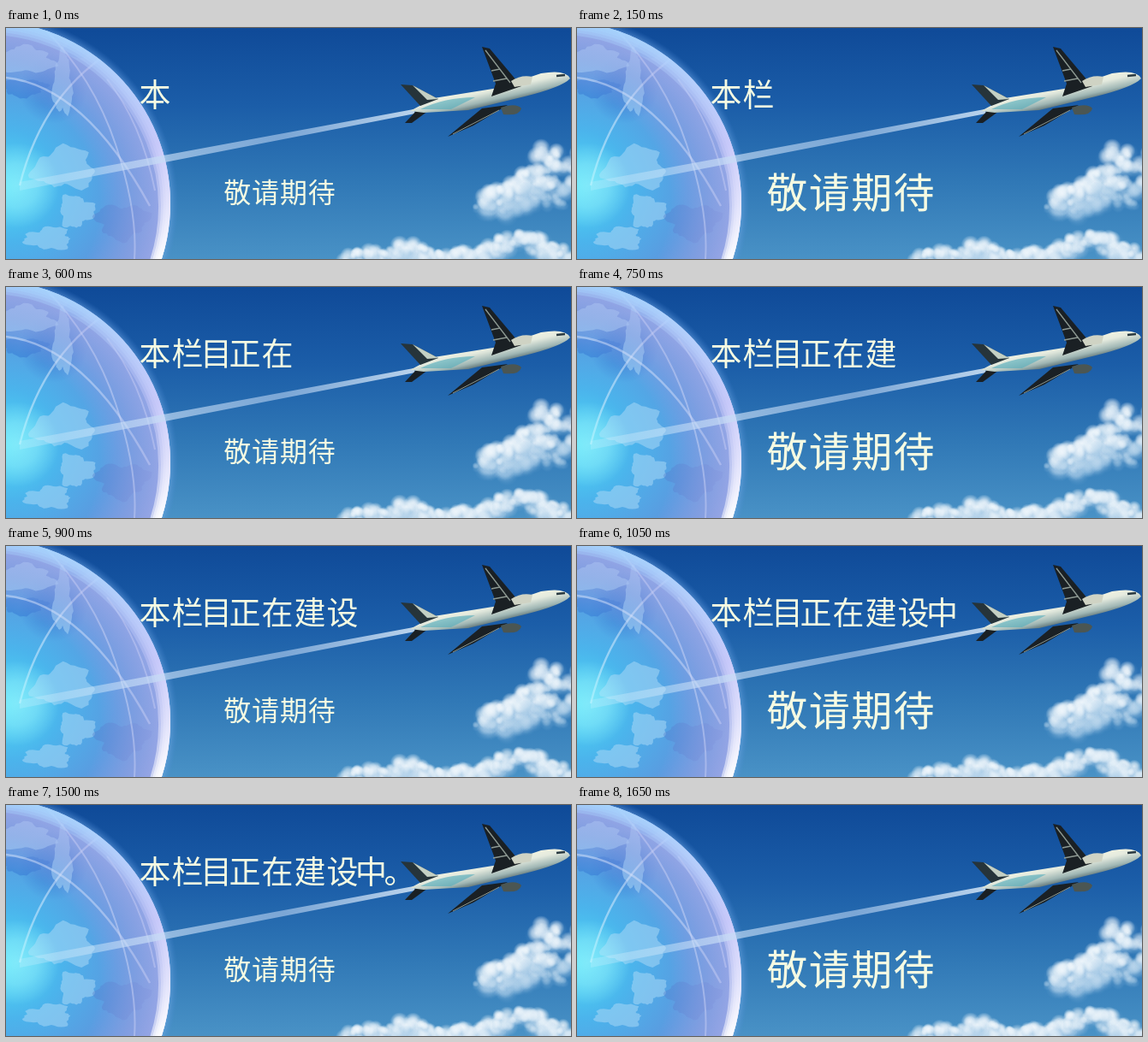
An HTML page with a canvas for the animation above (1800 ms loop, 660 by 270 pixels).

```html
<!DOCTYPE html>
<html lang="zh">
<head>
<meta charset="utf-8">
<style>
html, body { margin: 0; width: 100%; height: 100%; overflow: hidden; background: #1b5da8; }
canvas { display: block; }
</style>
</head>
<body>
<canvas id="stage" width="660" height="270"></canvas>
<script>
const W = 660, H = 270, STEP = 150, STEPS = 12, TAU = Math.PI * 2;
const stage = document.getElementById('stage').getContext('2d');
const scenery = document.createElement('canvas');
scenery.width = W;
scenery.height = H;
const g = scenery.getContext('2d');

let seed = 11;
function random() {
  seed = (seed * 16807) % 2147483647;
  return seed / 2147483647;
}
const bump = (x, center, width) => Math.exp(-(((x - center) / width) ** 2));

// Spreads the colors evenly along the gradient.
function spread(gradient, colors) {
  colors.forEach((color, i) => gradient.addColorStop(i / (colors.length - 1), color));
  return gradient;
}
const linear = (x0, y0, x1, y1, ...colors) => spread(g.createLinearGradient(x0, y0, x1, y1), colors);
const radial = (x, y, r0, r1, ...colors) => spread(g.createRadialGradient(x, y, r0, x, y, r1), colors);

function wash(fill) {
  g.fillStyle = fill;
  g.fillRect(0, 0, W, H);
}
function glow(x, y, r, rgb, alpha) {
  g.fillStyle = radial(x, y, 0, r, `rgba(${rgb},${alpha})`, `rgba(${rgb},${alpha * 0.7})`, `rgba(${rgb},0)`);
  g.fillRect(x - r, y - r, r * 2, r * 2);
}
function shape(path, fill) {
  g.fillStyle = fill;
  g.fill(new Path2D(path));
}
function line(path, color, width) {
  g.strokeStyle = color;
  g.lineWidth = width;
  g.stroke(new Path2D(path));
}

// An ellipse with a rough coastline.
function island(x, y, rx, ry, fill) {
  const phase = random() * TAU;
  g.beginPath();
  for (let a = 0; a < TAU; a += 0.12) {
    const k = 1 + 0.16 * Math.sin(3 * a + phase) + 0.1 * Math.sin(7 * a - phase) + 0.12 * (random() - 0.5);
    g.lineTo(x + Math.cos(a) * rx * k, y + Math.sin(a) * ry * k);
  }
  g.fillStyle = fill;
  g.fill();
}

function drawGlobe() {
  const x = -21, y = 205, r = 213;
  wash(radial(x, y, r - 2, r + 9, 'rgba(130,185,240,.5)', 'rgba(80,140,220,0)'));
  g.save();
  g.beginPath();
  g.arc(x, y, r, 0, TAU);
  g.clip();
  wash(radial(0, 185, 0, 195, '#4cdcf6', '#4bb4ec', '#5a9be0', '#6f95d8'));
  glow(55, 72, 40, '40,100,200', 0.4);

  const land = 'rgba(160,212,246,.6)';
  island(22, 38, 34, 15, land);
  island(66, 66, 11, 36, land);
  island(68, 164, 35, 24, land);
  island(82, 214, 20, 18, land);
  island(50, 246, 26, 13, land);
  island(136, 226, 30, 20, 'rgba(85,125,205,.4)');
  island(20, 70, 26, 10, 'rgba(52,120,212,.5)');
  island(86, 26, 18, 8, 'rgba(52,120,212,.5)');

  const grid = 'rgba(228,242,255,.5)';
  line('M44 0Q102 58 128 136T150 270', grid, 2);
  line('M0 58Q92 68 168 208', grid, 2.5);
  line('M16 184Q44 72 132 22', grid, 2.5);
  line('M118 60Q158 110 174 190', grid, 2);

  wash(radial(x, y, 130, r, 'rgba(165,165,235,0)', 'rgba(165,165,230,.42)', 'rgba(180,180,240,.68)'));
  glow(12, 184, 50, '170,250,255', 0.55);
  // The rim brightens and thickens towards the bottom.
  const light = linear(0, 0, 0, H, 'rgba(165,215,255,.35)', 'rgba(205,205,252,.4)', 'rgba(255,255,255,.55)');
  for (let width = 4; width <= 24; width += 5) {
    g.strokeStyle = light;
    g.lineWidth = width;
    g.beginPath();
    g.arc(x - width * 0.08, y + width * 0.15, r, 0, TAU);
    g.stroke();
  }
  g.restore();
}

function drawTrail() {
  shape('M16 180L476 95 478 100 16 190Z',
    linear(16, 0, 478, 0, 'rgba(225,245,255,.2)', 'rgba(200,222,246,.68)', 'rgba(170,200,235,.65)', 'rgba(215,232,248,.85)'));
}

function drawPlane() {
  const dark = '#1a2024', glint = '#8d9992';
  shape('M516 127L556 94 586 90 546 114Z', dark);
  line('M522 124L576 96', glint, 1);
  shape('M466 111L480 96 493 97 474 111Z', dark);
  shape('M472 97L500 82 575 70 625 53Q654 48 659 59 650 69 606 80L540 96 488 99Z',
    linear(560, 64, 567, 95, '#f6f6e2', '#e4eade', '#9fb6b4', '#34474e'));
  shape('M484 95Q512 81 548 81L520 95Z', 'rgba(90,175,190,.65)');
  shape('M461 66L475 67 505 83 484 91Z', '#26343a');
  shape('M475 67L505 83 492 84Z', '#c4d0c4');
  shape('M556 22L565 24 602 68 567 80 572 65Z', dark);
  line('M560 26L589 64M567 50L577 48M569 62L585 59', glint, 1.3);
  shape('M590 62Q602 54 615 57L613 66 594 69Z', '#cfd3c4');
  shape('M578 93Q596 87 602 94 600 103 581 101Z', '#4b5653');
  line('M643 56L653 55', '#293941', 2.5);
}

// Packs soft puffs along a path; they turn blue and faint towards the underside.
function drawCloud(count, path) {
  for (let i = 0; i < count; i++) {
    const [x, y, r] = path(random());
    const angle = random() * TAU;
    const reach = Math.sqrt(random());
    const depth = (1 + Math.sin(angle) * reach) / 2;
    const px = x + Math.cos(angle) * reach * r;
    const py = y + Math.sin(angle) * reach * r;
    const size = 4 + random() * 7;
    glow(px + 1, py + 3, size * 1.3, '135,182,220', 0.3);
    glow(px, py, size, depth > 0.65 ? '205,226,242' : '250,253,255', 0.8 - depth * 0.4);
  }
}

function drawScenery() {
  wash(linear(0, 0, 0, H, '#0f4a98', '#1b5da8', '#3078b6', '#4992c6'));
  drawGlobe();
  drawTrail();
  drawCloud(230, t => [560 + 92 * t, 204 - 8 * t - 31 * t * t, 13 + 5 * t + 23 * t * t]);
  drawCloud(260, t => {
    const x = 398 + 262 * t;
    return [x, 271 - 22 * bump(x, 598, 38) - 9 * bump(x, 465, 25), 11];
  });
  drawPlane();
}

function drawGlyph(char, x, y, size) {
  stage.font = `400 ${size}px "Noto Sans CJK SC", "Noto Sans CJK", sans-serif`;
  stage.fillText(char, x, y + size * 0.38);
}

// Box-shaped characters take less room than the others.
function drawNotice(length) {
  const advance = char => '目中'.includes(char) ? 29 : 38;
  let left = 155;
  for (const char of '本栏目正在建设中。'.slice(0, length)) {
    drawGlyph(char, left + advance(char) / 2, 78, 37);
    left += advance(char);
  }
}

function drawInvitation(size) {
  [...'敬请期待'].forEach((char, i) => drawGlyph(char, 319.5 + (i - 1.5) * size * 1.028, 192, size));
}

function render(now) {
  const step = Math.floor(now / STEP) % STEPS;
  stage.drawImage(scenery, 0, 0);
  stage.fillStyle = '#f5fae2';
  stage.textAlign = 'center';
  if (step < STEPS - 1) drawNotice(step + 1);
  drawInvitation(step % 2 ? 48 : 32);
}

function tick() {
  render(performance.now());
  requestAnimationFrame(tick);
}

drawScenery();
tick();
</script>
</body>
</html>
```
